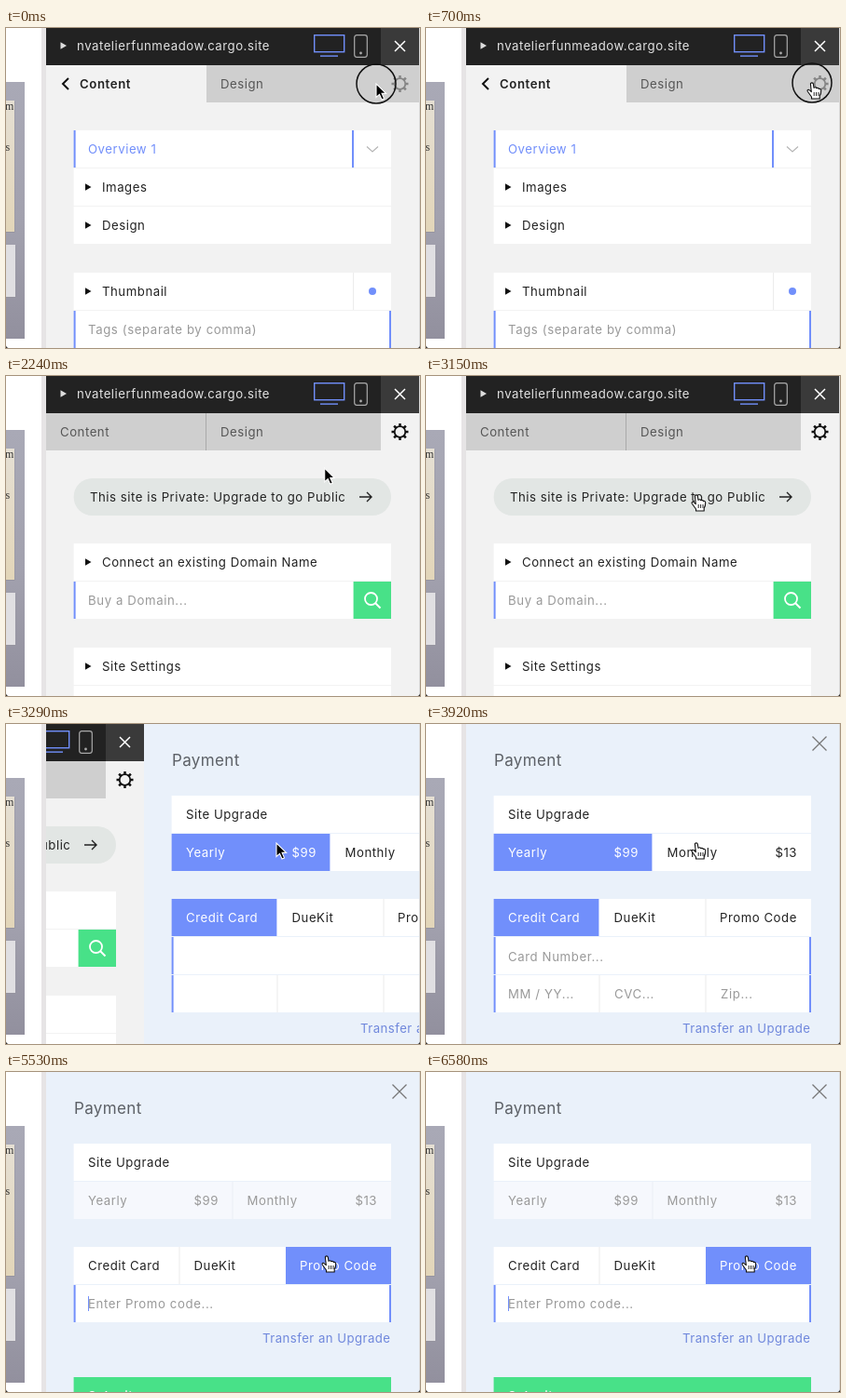
An HTML page that plays this animation: 444x344 px, repeating every 6720 ms.

```html
<!DOCTYPE html>
<html lang="en">
<head>
<meta charset="utf-8">
<title>Site upgrade</title>
<style>
  html, body { margin: 0; width: 100%; height: 100%; overflow: hidden; background: #fff; }
  svg { display: block; width: 444px; height: 344px; }
  text { font: 13.2px Inter, "Open Sans", sans-serif; letter-spacing: .53px; fill: #222; white-space: pre; }
  .hint { fill: #999; letter-spacing: .61px; }
  .blue { fill: #728ffb; }
  .link { fill: #6f87dc; letter-spacing: .46px; }
  .white { fill: #fff; }
  .tab { fill: #555; }
  .dim { fill: #999; }
  .bold { font-weight: 600; letter-spacing: .6px; }
  .title { font-size: 17px; letter-spacing: .36px; fill: #5c6066; }
  .serif { font: 12px "Liberation Serif", serif; letter-spacing: 0; fill: #333; }
</style>
</head>
<body>
<svg id="stage" viewBox="0 0 444 344"></svg>
<script>
const LOOP = 6720, STEP = 70, PANEL = 400;
const BLUE = '#718ffb', GREEN = '#48e188', LINE = '#ececec', GREY = '#cfcfcf', PAPER = '#f2f2f2';
const LEFT = 72.6, WIDTH = 340.4;

// Markup helpers; text is placed by the middle of its row
const box = (x, y, w, h, fill = '#fff', more = '') =>
  `<rect x="${x}" y="${y}" width="${w}" height="${h}" fill="${fill}" ${more}/>`;
const path = (d, stroke, width = 1, fill = 'none', more = '') =>
  `<path d="${d}" stroke="${stroke}" stroke-width="${width}" fill="${fill}" ${more}/>`;
const text = (x, mid, str, cls = '', more = '') =>
  `<text x="${x}" y="${mid + 5}" class="${cls}" ${more}>${str}</text>`;
const endText = (x, mid, str, cls) => text(x, mid, str, cls, 'text-anchor="end"');
const group = (id, body) => `<g id="${id}">${body}</g>`;
const cross = (x, y, r, stroke, width) =>
  path(`M${x - r} ${y - r}l${2 * r} ${2 * r}m0 ${-2 * r}l${-2 * r} ${2 * r}`, stroke, width);
const triangle = (x, y, fill) => path(`M${x} ${y - 3.7}l6.5 3.7l-6.5 3.7z`, 'none', 0, fill);
const bar = (y, fill) => box(LEFT, y, WIDTH, 40, fill);
const edge = (x, y) => box(x, y, 2, 40, BLUE);
const row = (y, label) => bar(y) + triangle(85, y + 20, '#111') + text(103, y + 20, label);
const field = y => bar(y) + edge(LEFT, y) + edge(411, y);

function gear(color) {
  let teeth = '';
  for (let i = 0; i < 8; i++) {
    const a = i * Math.PI / 4, c = Math.cos(a), s = Math.sin(a);
    teeth += `M${422.5 + 6 * c} ${60 + 6 * s}L${422.5 + 9 * c} ${60 + 9 * s}`;
  }
  return `<circle cx="422.5" cy="60" r="5.8" fill="none" stroke="${color}" stroke-width="1.8"/>` +
    path(teeth, color, 2.5);
}

function photo() {
  return `<defs><linearGradient id="wall" x2="0" y2="1">
      <stop offset="0" stop-color="#a9a9b6"/><stop offset=".55" stop-color="#a2a1ae"/>
      <stop offset="1" stop-color="#92909e"/></linearGradient>
    <linearGradient id="sheet" x2="0" y2="1"><stop offset="0" stop-color="#e5dfd3"/>
      <stop offset="1" stop-color="#e3d6b9"/></linearGradient></defs>` +
    box(0, 58, 20, 276, 'url(#wall)') +
    box(0, 79, 9.5, 141, '#96949f') + box(0, 78, 9, 141, 'url(#sheet)') +
    text(-1, 83, 'm', 'serif', 'font-weight="bold"') + text(-.5, 127, 's', 'serif') +
    box(0, 234, 10.5, 56, '#96949f') + box(0, 233, 10, 56, '#e0dfe2');
}

function topBar() {
  return box(43, 0, 360, 40, '#222') + box(402, 0, 42, 40, '#3a3a3a') +
    triangle(58.5, 19, '#ddd') +
    text(76, 19, 'nvatelierfunmeadow.cargo.site', '', 'style="fill:#e2e2e2"') +
    box(330.7, 7.7, 32, 18, 'none', `stroke="${BLUE}" stroke-width="1.4"`) +
    box(337, 29.4, 19, 1.4, BLUE) +
    box(373.7, 7.7, 13.6, 23.6, 'none', 'rx="2.5" stroke="#aaa" stroke-width="1.2"') +
    '<circle cx="380.5" cy="27" r="1.4" fill="#aaa"/>' +
    cross(422.5, 19.5, 5.5, '#fff', 1.5);
}

function contentPage() {
  return box(43, 40, 172, 40, PAPER) + box(215, 40, 229, 40, GREY) +
    path('M67 54l-6 6l6 6', '#111', 2) + text(79, 60, 'Content', 'bold') +
    text(230, 60, 'Design', 'tab') + gear('#858585') +
    bar(110) + edge(LEFT, 110) + edge(371, 110) +
    text(88, 130, 'Overview 1', 'blue') + path('M387 127.5l6 5.5l6 -5.5', '#b5b5b5', 1.2) +
    row(151, 'Images') + row(192, 'Design') + row(263, 'Thumbnail') +
    box(372, 263, 1, 40, LINE) + `<circle cx="393" cy="283" r="4" fill="${BLUE}"/>` +
    field(304) + text(88, 324, 'Tags (separate by comma)', 'hint');
}

function settingsPage() {
  return box(43, 40, 359, 40, GREY) + box(214, 40, 1, 40, '#aaa') +
    text(58, 60, 'Content', 'tab') + text(230, 60, 'Design', 'tab') + gear('#111') +
    box(LEFT, 110, WIDTH, 40, '#e2e6e4', 'rx="20"') +
    text(90, 130, 'This site is Private: Upgrade to go Public') +
    path('M379 130h13m-5 -5l5 5l-5 5', '#222', 1.4) +
    row(180, 'Connect an existing Domain Name') +
    bar(221) + edge(LEFT, 221) + text(88, 241, 'Buy a Domain...', 'hint') +
    box(372.6, 221, 40.4, 40, GREEN) +
    '<circle cx="391.5" cy="239.5" r="6.5" fill="none" stroke="#fff" stroke-width="1.8"/>' +
    path('M396 244l5.5 5.5', '#fff', 2) +
    row(292, 'Site Settings') + box(LEFT, 333, WIDTH, 11);
}

function paymentPage() {
  const cardForm =
    bar(118) + box(LEFT, 118, 169.8, 40, BLUE) +
    text(88, 138, 'Yearly', 'white') + endText(228, 138, '$99', 'white') +
    text(258.5, 138, 'Monthly') + endText(398, 138, '$13') +
    bar(188) + box(LEFT, 188, 112.8, 40, BLUE) + box(299.5, 188, 1, 40, LINE) +
    text(88, 208, 'Credit Card', 'white') + text(201.5, 208, 'DueKit') + text(315, 208, 'Promo Code') +
    group('hover', box(300, 188, 113, 40, '#f5f6fc') + text(315, 208, 'Promo Code', 'tab')) +
    field(229) + field(270) + box(185.5, 270, 1, 40, LINE) + box(299.5, 270, 1, 40, LINE) +
    group('hints', text(88, 250, 'Card Number...', 'hint') + text(88, 290, 'MM / YY...', 'hint') +
      text(202, 290, 'CVC...', 'hint') + text(316, 290, 'Zip...', 'hint')) +
    text(275, 327, 'Transfer an Upgrade', 'link');
  const promoForm =
    bar(118, '#f6f8fd') + box(242.5, 118, 1, 40, '#e9edf5') +
    text(88, 138, 'Yearly', 'dim') + endText(228, 138, '$99', 'dim') +
    text(258.5, 138, 'Monthly', 'dim') + endText(398, 138, '$13', 'dim') +
    bar(188) + box(185.5, 188, 1, 40, LINE) + box(300, 188, 113, 40, BLUE) +
    text(88, 208, 'Credit Card') + text(201.5, 208, 'DueKit') + text(315, 208, 'Promo Code', 'white') +
    field(229) + text(88, 249, 'Enter Promo code...', 'hint') +
    '<rect id="caret" x="88" fill="#728ffb"/>' +
    text(275, 286, 'Transfer an Upgrade', 'link') +
    box(LEFT, 328, WIDTH, 16, GREEN) + text(88, 348, 'Submit', 'bold white');
  return box(43, 0, 401, 344, '#eaf1fa') + text(73, 39.6, 'Payment', 'title') +
    cross(422, 21, 7.5, '#777', 1.3) +
    bar(77) + text(88, 97, 'Site Upgrade') +
    group('card', cardForm) + group('promo', promoForm);
}

const arrow = path('M0 0V14.5L3.5 11.4L6 17L8.5 15.9L6.1 10.4H10.6Z', '#fff', 1.1, '#000');
const hand = path('M-1.6 1C-1.6 -.5 1.1 -.5 1.3 1L2 5.3C3 4.3 4.5 4.7 4.7 5.7C5.9 5 7.2 5.6 7.3 6.6' +
  'C8.6 6 9.7 6.8 9.7 8.2C9.8 10.5 9.2 12.5 8.2 14V17H-.5V15C-2 13 -3.5 11 -4.7 9.3' +
  'C-5.7 7.7 -3.8 6.5 -2.6 7.8L-.7 9.6Z', '#111', 1.1, '#fff', 'stroke-linejoin="round"') +
  path('M2.2 10v4M4.6 10v4M7 10v4', '#111', .9);

const stage = document.getElementById('stage');
stage.innerHTML = box(0, 0, 444, 344) + photo() + box(38, 0, 5, 344, '#e6e4e5') +
  '<clipPath id="clip"><rect x="43" width="401" height="344"/></clipPath>' +
  '<g clip-path="url(#clip)">' +
  group('site', box(43, 0, 401, 344, PAPER) + topBar() +
    group('content', contentPage()) + group('settings', settingsPage())) +
  group('payment', paymentPage()) + '</g>' +
  box(443, 0, 1, 344, '#dadada') +
  path('M0 341.5V344H2.5Q.5 343.5 0 341.5M444 341.5V344H441.5Q443.5 343.5 444 341.5', 'none', 0, '#222') +
  '<circle id="ring" fill="none" stroke="#111" stroke-width="1.5"/>' +
  group('arrow', arrow) + group('hand', hand);

const el = {};
stage.querySelectorAll('[id]').forEach(e => el[e.id] = e);
const show = (e, on) => e.setAttribute('visibility', on ? 'inherit' : 'hidden');
const move = (e, x, y = 0) => e.setAttribute('transform', `translate(${x} ${y})`);

const moves = [ // start, end, target x, target y
  [280, 560, 414, 59],
  [1890, 2520, 290, 128],
  [4200, 4900, 344, 198]
];
const clicks = [700, 980, 3010, 4970];
const slide = [.32, .7375, .91, .98, 1]; // one value per step from 3220

function pointer(t) {
  let x = 397, y = 60;
  for (const [from, to, tx, ty] of moves) {
    const p = Math.min(1, Math.max(0, (t - from) / (to - from)));
    const e = p * p * (3 - 2 * p);
    x += (tx - x) * e;
    y += (ty - y) * e;
  }
  return [x, y];
}

function ringSize(t) {
  if (t < 70) return 21;
  const start = clicks.find(c => t >= c && t < c + 2 * STEP);
  return start === undefined ? 0 : t < start + STEP ? 21 : 31;
}

function isHand(t, y) {
  if (t < 1960) return t >= 560;
  if (t < 3220) return t >= 2730;
  if (t < 3500) return false;
  return y < 158 || y > 188;
}

function draw(now) {
  const t = Math.floor(now % LOOP / STEP) * STEP;
  const [x, y] = pointer(t);
  const r = ringSize(t), pointing = isHand(t, y);

  show(el.content, t < 1120);
  show(el.settings, t >= 1120);

  const s = t < 3220 ? 0 : slide[Math.min(4, (t - 3220) / STEP)];
  move(el.site, -PANEL * s);
  move(el.payment, PANEL * (1 - s));
  show(el.payment, s > 0);

  show(el.card, s > 0 && t < 5110);
  show(el.promo, t >= 5110);
  show(el.hints, t >= 3920 && t < 5110);
  show(el.hover, t >= 4970 && t < 5110);

  const thick = t >= 5670 && t < 6160;
  show(el.caret, thick || t >= 5530 && t < 5670 || t >= 6580);
  el.caret.setAttribute('width', thick ? 2 : 1);
  el.caret.setAttribute('y', thick ? 240 : 241);
  el.caret.setAttribute('height', thick ? 17 : 16);

  show(el.ring, r > 0);
  el.ring.setAttribute('r', r);
  move(el.ring, x, y);
  move(el.arrow, x, y);
  move(el.hand, x, y);
  show(el.arrow, !pointing);
  show(el.hand, pointing);
}

function tick() {
  draw(performance.now());
  requestAnimationFrame(tick);
}
tick();
</script>
</body>
</html>
```
